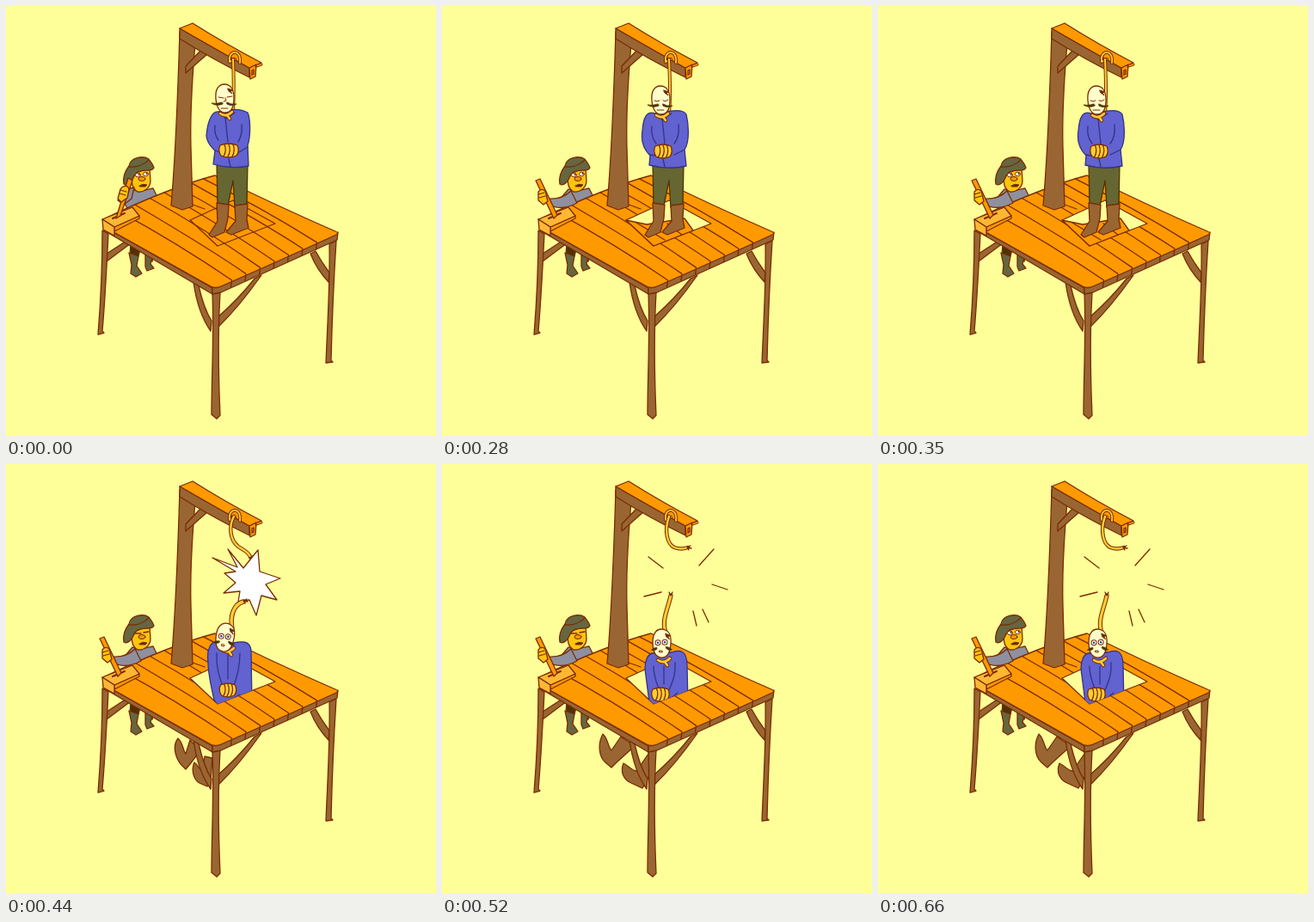
An HTML page that plays this animation: 500 by 500 pixels, repeating every 0.72 s.

```html
<!DOCTYPE html>
<html lang="en">
<head>
<meta charset="utf-8">
<title>Trapdoor</title>
<style>
  html, body { margin: 0; width: 100%; height: 100%; overflow: hidden; background: #ffff99; }
  svg { display: block; width: 100vw; height: 100vh; }
  path, ellipse { stroke-linejoin: round; stroke-linecap: round; }
</style>
</head>
<body>
<svg id="stage" viewBox="0 0 500 500"></svg>
<script>
const LOOP = 720;
const C = {
  paper: '#ffff99', wood: '#ff9900', brown: '#996633', ink: '#7a2c00', rope: '#ffcc33',
  blue: '#6262d0', navy: '#333388', green: '#666633', dark: '#4d3300', skin: '#ffffcc',
  gold: '#ffc40d', hat: '#666640', shirt: '#8e90a0', box: '#ffb733', white: '#ffffff'
};

const p = (d, fill = 'none', ink = C.ink, w = 1.3) =>
  `<path d="${d}" fill="${fill}" stroke="${ink}" stroke-width="${w}"/>`;
const oval = (x, y, rx, ry, fill, ink = C.ink, w = 1) =>
  `<ellipse cx="${x}" cy="${y}" rx="${rx}" ry="${ry}" fill="${fill}" stroke="${ink}" stroke-width="${w}"/>`;
const rope = (d, w = 3) => p(d, 'none', C.ink, w + 2) + p(d, 'none', C.rope, w);
const group = (body, attrs = '') => `<g ${attrs}>${body}</g>`;
const during = (from, to, body) => group(body, `data-from="${from}" data-to="${to}"`);

// Table
const tableLegs = () =>
  p('M117 288L140 273L145 276L117 297Z', C.brown) +
  p('M112 261L119 265C117 305 115 345 112 378L114 380L107 382C110 345 112 300 112 261Z', C.brown) +
  p('M354 288L360 285Q367 298 376 310L375 321Q361 306 354 288Z', C.brown) +
  p('M376 277L384 273C381 320 379 370 378 412L380 414L372 415C374 365 377 320 376 277Z', C.brown) +
  p('M218 321L224 325Q230 352 239 366L238 378Q223 357 218 321Z', C.brown) +
  p('M289 317L297 313Q271 350 247 373L246 362Q270 341 289 317Z', C.brown) +
  p('M240 334L249 333C246 385 247 430 249 476L245 480L239 475C239 430 242 385 240 334Z', C.brown);

const backEdge = t => [
  (1 - t) ** 2 * 113 + 2 * t * (1 - t) * 190 + t * t * 243,
  (1 - t) ** 2 * 248 + 2 * t * (1 - t) * 211 + t * t * 197
];

function planks() {
  let out = '';
  for (let k = 1; k < 8; k++) {
    const [x, y] = backEdge(k / 8);
    const ex = 246 + 16.5 * k, ey = 326 - 7.3 * k;
    const dx = (ex - x) / 3, dy = (ey - y) / 3, sway = k % 2 ? 3 : 1;
    out += p(`M${x} ${y}C${x + dx} ${y + dy - sway} ${x + 2 * dx} ${y + 2 * dy - 3} ${ex} ${ey}l-1 8`);
  }
  return out;
}

const deck = () =>
  p('M113 256L240 328L240 335L114 261Z', C.brown) +
  p('M240 327L249 325L386 263L385 272L250 333L240 335Z', C.brown) +
  p('M113 248Q190 211 243 197Q312 231 383 262Q388 264 384 266Q314 298 250 326Q243 329 238 326Q175 291 113 256Z', C.wood) +
  planks();

const mechanism = () =>
  p('M126 257L155 244L155 247L126 262Z', C.wood) +
  p('M112 248L147 234L155 244L126 257Z', C.box) +
  p('M112 248L126 257L126 267L113 260Z', C.box) +
  p('M124 247L138 241', 'none', C.ink, 2);

const gallows = () =>
  p('M202 30L220 44C216 90 214 130 215 165L217 233L205 237L192 232C198 165 200 95 202 30Z', C.brown) +
  p('M209 70L226 52L234 56L209 78Z', C.brown) +
  p('M202 26Q240 48 283 72L283 83Q240 62 202 38Z', C.brown) +
  p('M202 26L217 20Q255 44 297 66L283 72Q240 48 202 26Z', C.wood) +
  p('M283 72L291 68L290 82L284 85Z', C.wood) +
  p('M286 75l2-1l0 5l-2 1Z') +
  p('M291 70L297 68', 'none', C.ink, 3) + p('M292 69.5L297 68', 'none', C.wood, 1.5) +
  p('M217 231L231 236');

const hole = 'M214 249L264 226L313 253L246 279Z';
const beamLoop = rope('M260 65C259 57 263 53 267 54C271 55 273 60 272 66M260 65L266 62', 1.8);

// Helper by the platform
const helper = () =>
  p('M145 276L156 283L154 291L144 290Z', C.dark) + p('M162 287L171 292L170 297L163 294Z', C.dark) +
  p('M143 287L154 291L152 302L158 311L151 315L145 311L146 301Z', C.hat) +
  p('M162 289L170 293L168 300L172 305L164 308L162 303Z', C.hat) +
  p('M147 213C155 217 166 213 171 212L176 222L170 235L146 245L136 226Z', C.shirt) +
  p('M147 194C145 206 147 213 153 216C161 217 168 211 168 203L167 189Z', C.gold) +
  p('M137 207C135 197 140 190 143 186C145 175 160 174 166 178C168 181 171 184 172 188C170 193 163 190 157 192C150 193 149 198 147 202C144 207 140 209 137 207Z', C.hat) +
  p('M143 187C151 188 160 185 166 179') +
  oval(158, 201, 4, 2.5, '#ee9a10') + p('M155 209Q159 206 164 208L162 210L156 210Z', C.dark, C.ink, 1);

const openEyes = () =>
  oval(153.5, 196.5, 3, 2.3, C.white) + oval(162.5, 195.5, 3, 2.3, C.white) +
  oval(154.5, 196, .6, .6, C.ink) + oval(163.5, 195, .6, .6, C.ink);
const shutEyes = () =>
  p('M150 197L157 197M160 196L166 195');

const leverUp = () =>
  p('M140 213L149 211L146 224L137 231L130 226Z', C.shirt) +
  p('M142 200L147 203L133 244L128 247Z', C.wood) +
  p('M133 213C137 207 143 209 143 214L141 223L134 228L130 224Z', C.gold) +
  p('M133 214L140 216M132 218L139 220');
const leverDown = () =>
  p('M150 215C142 223 133 225 122 224L121 229C133 237 146 235 157 229Z', C.shirt) +
  p('M109 203L114 201L134 243L130 247Z', C.wood) +
  p('M112 216C116 211 121 214 121 219L123 227L118 231L112 226Z', C.gold) +
  p('M112 219L119 217M113 223L120 221');

// Man on the trapdoor
const cuffs = (x, y, w = 20) => {
  const h = w / 2;
  let out = p(`M${x - h} ${y - 6}Q${x} ${y - 10} ${x + h} ${y - 6}Q${x + h + 3} ${y + 1} ${x + h - 1} ${y + 6}Q${x} ${y + 10} ${x - h + 1} ${y + 6}Q${x - h - 3} ${y} ${x - h} ${y - 6}Z`, C.rope);
  for (let i = 1; i < 4; i++) out += p(`M${x - h + i * w / 4} ${y - 7}q3 7 -1 14`);
  return out;
};

const skull = 'M244 108C243 97 247 91 254 91C261 91 265 97 265 107C265 118 262 124 255 124C248 124 245 118 244 108Z';
const stache = 'M251 112Q245 114 239 113Q245 117 252 114ZM257 112Q262 115 268 114Q262 117 257 114Z';
const droop = 'M249 113Q245 113 243 116Q246 117 249 115ZM260 111Q264 111 267 114Q263 116 260 113Z';
const head = (face, whiskers = stache) =>
  p(skull, C.skin) + p('M258 96L264 98L261 99L263 102L259 99Z', C.dark, C.ink, 1) + face +
  p(whiskers, C.dark, C.dark, .8);
const calmFace = () =>
  p('M247 106L253 107M257 106L263 105', 'none', C.ink, 1) +
  p('M255 107L256 110L253 111M250 119L258 119', 'none', C.ink, 1);
const closedFace = () =>
  p('M247 108Q250 110 253 108M257 108Q260 110 263 107M250 119L258 119', 'none', C.ink, 1);
const wideFace = () =>
  oval(250, 105, 3.4, 5, C.white) + oval(259, 104, 3.4, 5, C.white) +
  oval(250, 106, .8, 1, C.ink) + oval(259, 105, .8, 1, C.ink) + oval(254, 119, 2, 1.5, C.dark);
const dazedFace = () =>
  oval(250, 107, 3, 3, C.white) + oval(258, 106, 3, 3, C.white) +
  oval(250, 107, .8, .8, C.blue, C.navy) + oval(258, 106, .8, .8, C.blue, C.navy) +
  oval(254, 117, 2, 1, C.skin);

const noose = (x, y) => rope(`M${x - 7} ${y}Q${x} ${y + 5} ${x + 7} ${y - 2}M${x + 1} ${y + 2}l3 4`, 2.5);

const legs = () =>
  p('M245 183L281 183L280 232L266 234L264 203L258 232L246 231Z', C.green, C.dark) +
  p('M245 229L259 231L258 247L254 263L240 269L236 266L246 250Z', C.brown) +
  p('M266 232L281 230L280 248L282 258L262 266L256 263L267 250Z', C.brown);

const standingCoat = () =>
  p('M247 123C238 122 234 138 233 151C234 161 240 165 243 168L241 184Q262 190 282 186L281 162C285 150 284 130 281 124C272 118 255 121 247 123Z', C.blue, C.navy) +
  p('M243 139C242 147 244 152 247 156M274 138C275 147 273 153 270 158M243 168L249 170M271 170L281 164M255 130L258 158M259 178L261 187', 'none', C.navy) +
  p('M249 125L256 131L266 124', 'none', C.navy) + cuffs(259, 168);

const shruggedCoat = () =>
  p('M248 125C238 121 234 130 233 145C231 157 234 166 242 174L241 185Q263 191 284 186L282 167C289 157 286 134 284 126C279 118 262 123 248 125Z', C.blue, C.navy) +
  p('M244 140C243 149 245 155 249 160M275 138C276 148 274 155 270 160M242 173L248 174M270 173L282 167M256 131L259 160M257 178L259 187', 'none', C.navy) +
  p('M248 126L256 132L267 125', 'none', C.navy) + cuffs(257, 169, 18);

const fallingCoat = () =>
  p('M249 180C238 176 233 187 233 202C230 213 233 220 240 224L236 234Q263 240 287 234L283 219C290 208 287 187 282 179C273 173 259 177 249 180Z', C.blue, C.navy) +
  p('M244 193C243 203 245 209 249 213M275 191C276 203 273 209 269 213M240 223L248 224M269 223L284 218M256 187L258 210M258 228L259 236', 'none', C.navy) +
  p('M248 180L257 189L269 179', 'none', C.navy) + cuffs(257, 218, 18);

const droppedCoat = () =>
  p('M247 207C238 205 233 216 235 230C235 245 239 261 242 274L252 290L286 280L285 217C284 205 274 206 264 208Z', C.blue, C.navy) +
  p('M245 220C244 238 249 250 253 261M272 220C272 238 268 250 264 260M258 222L258 250M265 272L272 268', 'none', C.navy) +
  cuffs(258, 263, 17);

const slumpedCoat = () =>
  p('M249 220C239 218 234 230 237 246L241 277L252 290L286 280L285 234C285 215 275 216 267 219Z', C.blue, C.navy) +
  p('M246 235C246 248 250 255 253 264M271 231C272 245 268 253 264 263M258 235L258 256M264 274L274 266', 'none', C.navy) +
  cuffs(254, 268, 18);

const dangleA = () =>
  p('M200 319C193 328 197 342 204 350L209 355L214 349L226 333L214 321L209 337C206 334 206 324 200 319Z', C.brown) +
  p('M219 347C215 356 218 367 225 371L234 375L238 368L240 342L231 340L228 356C224 355 223 349 219 347Z', C.brown);
const dangleB = () =>
  p('M187 314C181 325 182 340 190 347L197 353L203 347L224 328L208 317L197 333C193 329 193 319 187 314Z', C.brown) +
  p('M211 348C207 358 211 367 220 371L233 377L238 369L244 354L240 337L226 357C220 356 216 350 211 348Z', C.brown);

const burst = 'M258 99L276 121L293 100L295 125L319 133L302 140L315 158L297 153L291 176L283 158L270 160L272 148L253 150L267 138L254 127L267 125L240 109L269 120Z';
const spark = () =>
  p('M264 119L271 113L268 122L273 125L267 127L269 134L263 129L257 131L260 125L255 121L261 121L260 113Z', C.white);
const rays = () =>
  p('M240 108L257 121M316 99L299 118M314 140L332 146M235 154L255 149M292 171L296 188M303 169L310 184');
const fray = (x, y) => p(`M${x} ${y}l4-2M${x} ${y}l5 1M${x} ${y}l2 3`);

const inHole = body => group(body, 'clip-path="url(#opening)"');
const moved = (x, y, turn, body) =>
  group(body, `transform="translate(${x} ${y}) rotate(${turn} 254 108)"`);

document.getElementById('stage').innerHTML =
  '<clipPath id="opening"><path d="M0 0H500V253H313L246 279L214 249H0Z"/></clipPath>' +
  `<path d="M0 0H500V500H0Z" fill="${C.paper}"/>` +
  helper() +
  during(0, 400, openEyes()) + during(400, 560, shutEyes()) + during(560, LOOP, openEyes()) +
  during(440, 520, dangleA()) + during(520, LOOP, dangleB()) +
  tableLegs() + deck() + mechanism() +
  during(0, 280, leverUp()) + during(280, LOOP, leverDown()) +
  during(0, 280, p(hole)) +
  during(280, LOOP, p(hole, C.paper)) +
  during(280, 400, p('M214 249L238 254L282 247L292 261L246 279Z', C.wood) + p('M226 252L259 272M262 253L279 266')) +
  gallows() + beamLoop +
  during(0, 280,
    rope('M264 62C265 82 265 102 264 124', 2) + legs() + standingCoat() + noose(256, 125) + head(calmFace())) +
  during(280, 400,
    rope('M264 62C265 82 266 102 264 125', 2) + legs() + shruggedCoat() + noose(256, 127) +
    moved(0, 2, 0, head(closedFace()))) +
  during(400, 440,
    rope('M264 62Q266 90 264 117M264 131L265 178', 1.8) +
    inHole(p('M244 232L282 232L281 285L265 285L263 252L260 285L245 285Z', C.green, C.dark)) +
    fallingCoat() + noose(257, 181) + moved(2, 55, 0, head(wideFace())) + spark()) +
  during(440, 520,
    rope('M265 61C259 72 260 88 270 96C276 100 282 102 284 108', 2.4) + fray(283, 109) +
    p(burst, C.white) +
    inHole(droppedCoat()) + noose(258, 216) +
    rope('M263 192C260 176 265 163 276 160', 3.5) + fray(276, 159) +
    moved(0, 94, 12, head(dazedFace(), droop))) +
  during(520, LOOP,
    rope('M264 61C258 78 262 93 270 97Q278 100 286 97', 2.4) + fray(285, 97) + rays() +
    inHole(slumpedCoat()) + noose(258, 228) +
    rope('M260 196C255 181 263 168 266 153', 3.2) + p('M266 153l-2-4M266 153l2-4') +
    moved(1, 101, 4, head(dazedFace(), droop)));

// Hard cuts: each pose is shown only inside its time span
for (const el of document.querySelectorAll('[data-from]')) {
  const from = +el.dataset.from, to = +el.dataset.to;
  const steps = [{ offset: 0, opacity: from ? 0 : 1 }];
  if (from) steps.push({ offset: from / LOOP, opacity: 1 });
  if (to < LOOP) steps.push({ offset: to / LOOP, opacity: 0 });
  steps.push({ offset: 1, opacity: to < LOOP ? 0 : 1 });
  const frames = steps.map(s => ({ ...s, easing: 'step-end' }));
  el.animate(frames, { duration: LOOP, iterations: Infinity }).startTime = 0;
}
</script>
</body>
</html>
```
